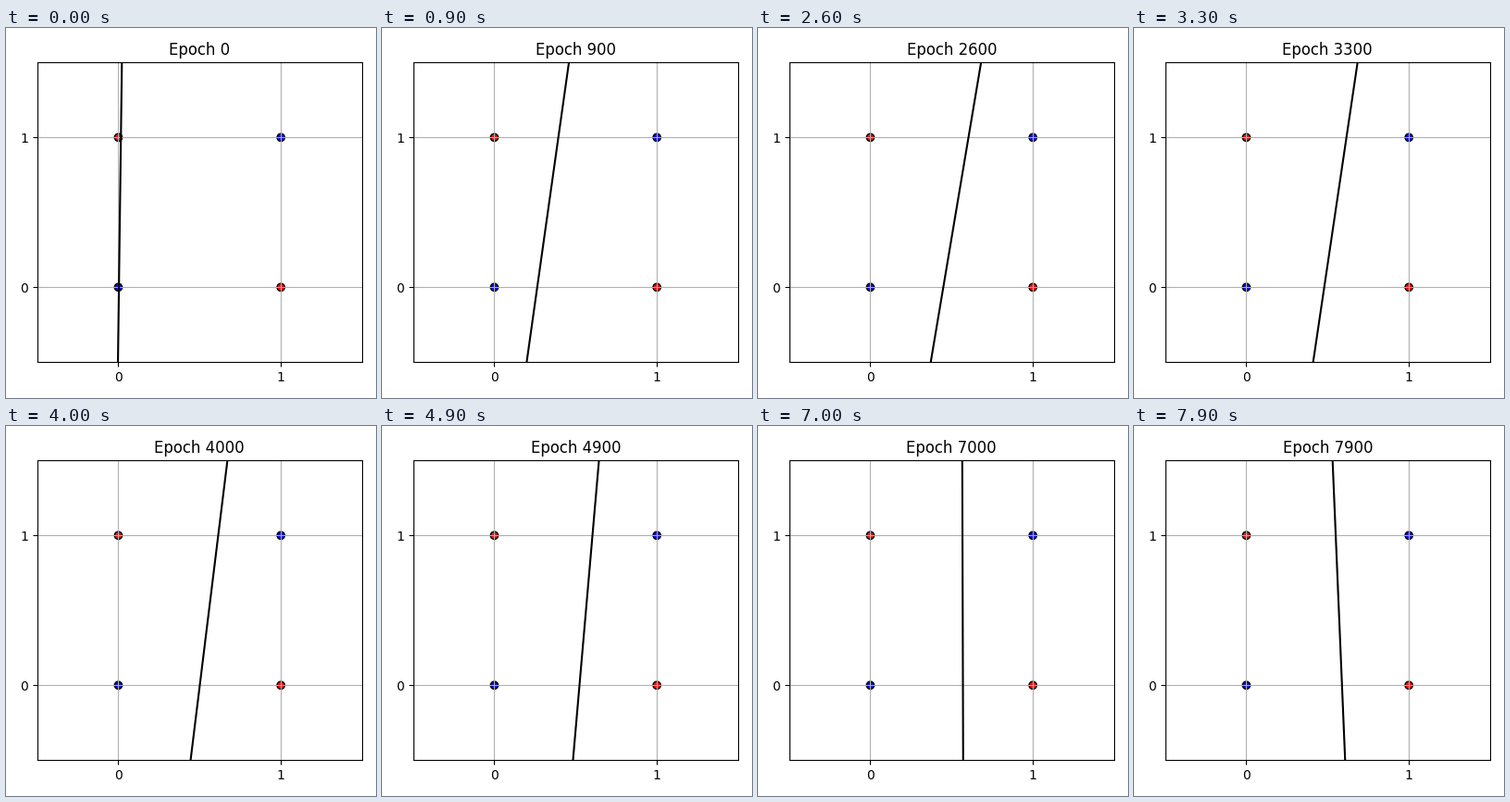
Recreate the animation shown at these times as a matplotlib script. Size 400 by 400 pixels, loop 8 s.

```python
import numpy as np
import matplotlib.pyplot as plt
from matplotlib.animation import FuncAnimation

FRAMES, INTERVAL = 80, 100
LOW, HIGH = -0.5, 1.5

fig, ax = plt.subplots(figsize=(4, 4), dpi=100)
ax.scatter([0, 0, 1, 1], [0, 1, 0, 1], c=["blue", "red", "red", "blue"],
           s=36, edgecolors="black", linewidths=1)
line, = ax.plot([], [], color="black", lw=1.5)
ax.set_xlim(LOW, HIGH)
ax.set_ylim(LOW, HIGH)
ax.set_xticks([0, 1])
ax.set_yticks([0, 1])
ax.grid(True)
# Just under 12 pt, so that hinting rounds the glyph height down
title = ax.set_title("Epoch 0", fontsize=11.88)
fig.tight_layout()


def boundary(t):
    """Weights of a linear unit learning XOR, as decaying modes; t in seconds."""
    slow = 0.5746 * np.exp(0.0799 * t)
    fast = 0.4014 * np.exp(-1.075 * t)
    w1 = 1 + slow + fast
    w2 = slow + fast - 1
    bias = 1.66 * fast - 1.0896 * slow - 0.0475
    return w1, w2, bias


def update(i):
    w1, w2, bias = boundary(i * INTERVAL / 1000)
    y = np.array([LOW, HIGH])
    line.set_data(-(w2 * y + bias) / w1, y)
    title.set_text(f"Epoch {i * 100}")
    return line, title


anim = FuncAnimation(fig, update, frames=FRAMES, interval=INTERVAL,
                     repeat=True, repeat_delay=0, blit=False)
plt.show()
```
